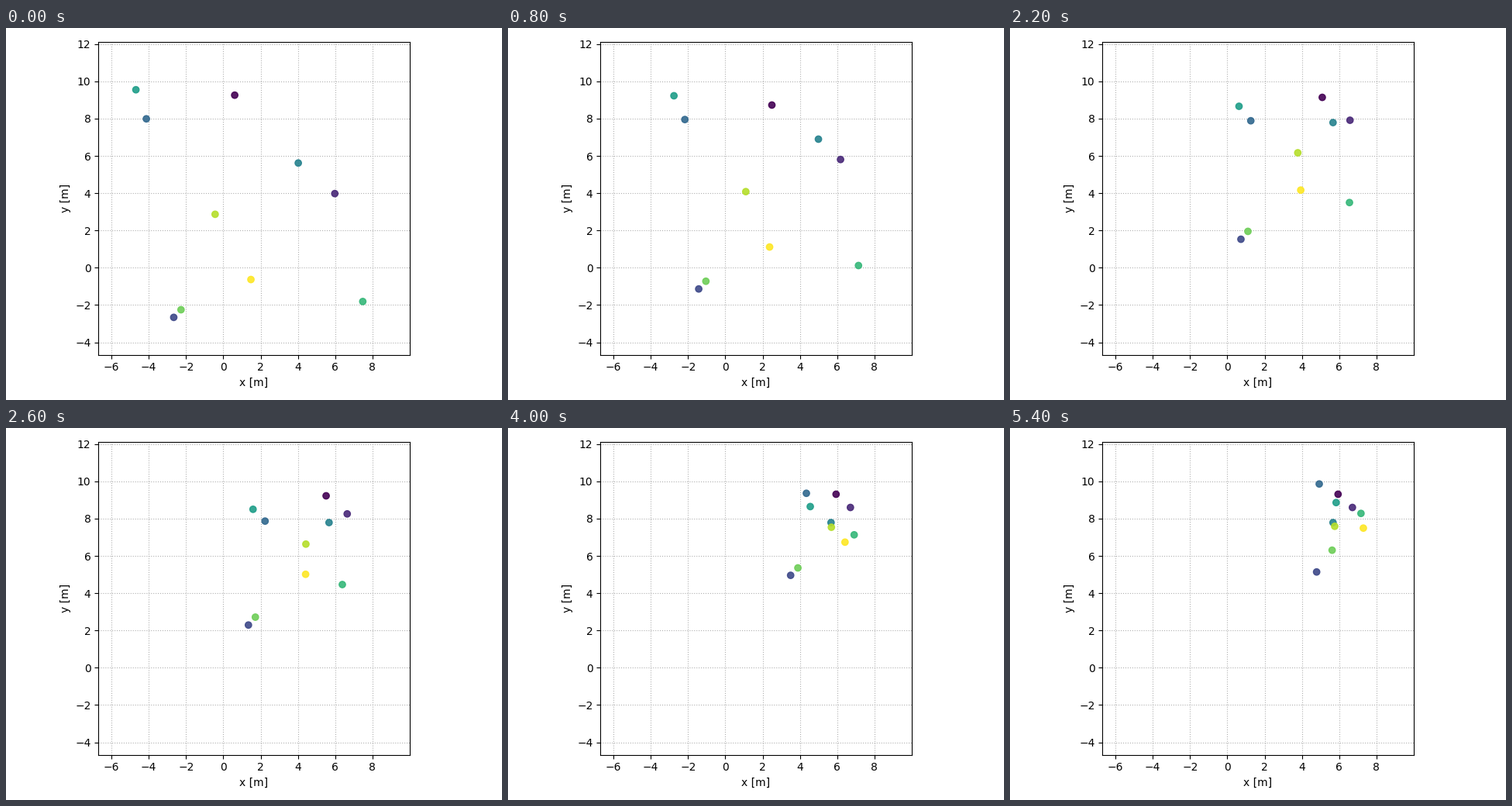
Write a matplotlib script that moves like this. It is 640x480 px and loops after 5.6 s.

```python
import numpy as np
import matplotlib.pyplot as plt
from matplotlib.animation import FuncAnimation

FRAMES, INTERVAL = 28, 200
GOAL = np.array([5.8, 7.8])   # shared meeting point, in metres
SPEED = 0.49                  # metres per step while cruising
RADIUS = 3.2                  # distance from the goal where agents peel off

# One agent per row: start x, y and resting x, y
AGENTS = np.array([
    [0.61, 9.26, 5.94, 9.31],
    [5.98, 3.98, 6.71, 8.60],
    [-2.66, -2.66, 4.79, 5.14],
    [-4.13, 7.99, 4.93, 9.86],
    [4.02, 5.62, 5.67, 7.79],
    [-4.69, 9.55, 5.88, 8.87],
    [7.48, -1.81, 7.18, 8.33],
    [-2.27, -2.25, 5.68, 6.34],
    [-0.44, 2.87, 5.76, 7.59],
    [1.48, -0.63, 7.34, 7.53],
])
START, REST = AGENTS[:, :2], AGENTS[:, 2:]


def length(v):
    return np.linalg.norm(v, axis=1, keepdims=True)


# Where and when each agent leaves its straight run at the goal
gap = length(GOAL - START)
heading = (GOAL - START) / gap
cruise = np.maximum(gap - RADIUS, 0)
peel = START + heading * cruise
peel_step = cruise / SPEED
settle_steps = 2 * length(REST - peel) / SPEED


def positions(step):
    """Cruise at constant speed, then brake evenly into the resting spot."""
    run = START + heading * np.minimum(step * SPEED, cruise)
    u = np.clip((step - peel_step) / settle_steps, 0, 1)
    return run + (REST - peel) * u * (2 - u)


fig, ax = plt.subplots(figsize=(6.4, 4.8), dpi=100)
dots = ax.scatter(*positions(0).T, c=np.arange(len(AGENTS)),
                  cmap="viridis", alpha=0.9, zorder=3)
ax.set_aspect("equal")
ax.set_xlim(-6.70, 9.99)
ax.set_ylim(-4.67, 12.12)
ax.set_xticks(range(-6, 9, 2))
ax.set_yticks(range(-4, 13, 2))
ax.set_xlabel("x [m]")
ax.set_ylabel("y [m]")
ax.grid(linestyle=":")
fig.tight_layout()


def update(step):
    dots.set_offsets(positions(step))
    return (dots,)


anim = FuncAnimation(fig, update, frames=FRAMES, interval=INTERVAL,
                     repeat=True, repeat_delay=0)
plt.show()
```
